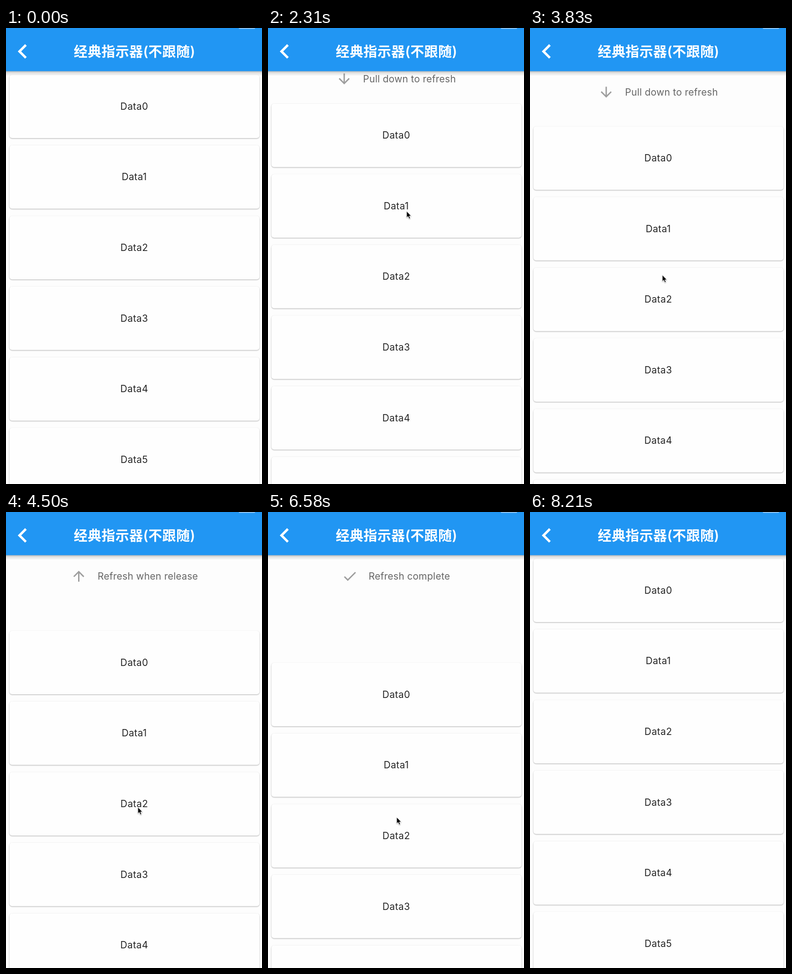
An HTML page that plays this animation: 561 px wide and 998 px high, repeating every 8.5 s.

```html
<!DOCTYPE html>
<html lang="zh">
<head>
<meta charset="utf-8">
<title>Pull to refresh</title>
<style>
  html, body { margin: 0; width: 100%; height: 100%; overflow: hidden; background: #fdfdfd; }
  svg { display: block; width: 561px; height: 998px; }
  text { font-family: Inter, Roboto, "Noto Sans CJK SC", "Noto Sans CJK", sans-serif; font-size: 21px; }
  .card rect { fill: #fefefe; filter: drop-shadow(0 1.6px 1px rgba(0, 0, 0, .32)); }
  .card text { fill: #262626; text-anchor: middle; letter-spacing: .4px; }
  #status { fill: #666; letter-spacing: .25px; }
  .title { font-size: 30px; font-weight: 600; fill: #fff; text-anchor: middle; letter-spacing: .4px; }
</style>
</head>
<body>
<svg viewBox="0 0 561 998">
  <defs>
    <linearGradient id="shade" x2="0" y2="1">
      <stop offset="0" stop-color="#000" stop-opacity=".3"/>
      <stop offset=".4" stop-color="#000" stop-opacity=".11"/>
      <stop offset="1" stop-color="#000" stop-opacity=".02"/>
    </linearGradient>
  </defs>
  <rect width="561" height="998" fill="#fdfdfd"/>
  <g id="header">
    <path id="icon" fill="#9e9e9e"/>
    <path id="spinner" fill="none" stroke="#2196f3" stroke-width="3"/>
    <text id="status" y="148"></text>
  </g>
  <g id="list"></g>
  <rect y="94" width="561" height="10" fill="url(#shade)"/>
  <rect width="561" height="94.5" fill="#2196f3"/>
  <rect x="510" y="-4" width="36" height="6" rx="2" fill="#90c8f8"/>
  <path d="M11.67 3.87L9.9 2.1 0 12l9.9 9.9 1.77-1.77L3.54 12z" transform="translate(26.9 33.2) scale(1.5)"
        fill="#fff" stroke="#fff" stroke-width="1"/>
  <text class="title" x="281.7" y="62">经典指示器(不跟随)</text>
  <path id="cursor" d="M0 0V14L3.2 11.2 5.6 16.5 8 15.4 5.8 10.4H10Z" stroke="#fff"
        style="filter: drop-shadow(0 1px 1px rgba(0,0,0,.35))"/>
</svg>
<script>
const LOOP = 8500, HEADER = 92.5, TRIGGER = 120;
const REFRESH_AT = 5200, DONE_AT = 6110;
const $ = id => document.getElementById(id);

const smooth = u => u * u * (3 - 2 * u);
const accelerate = u => u ** 1.45;
const decay = u => 1 - (1 + 5.7 * u) * Math.exp(-5.7 * u);
const spring = u => decay(u) / decay(1);

// Each gesture leads the pointer and the pull distance to the given values.
const START = { until: 690, x: 548, y: 942, pull: 0 };
const GESTURES = [
  { until: 1300, x: 311, y: 217, pull: 0, ease: smooth },
  { until: 3210, x: 293, y: 680, pull: 159.5, ease: accelerate },
  { until: 3800, x: 290, y: 540, pull: 113, ease: smooth },
  { until: 4500, x: 289, y: 646, pull: 158, ease: smooth },
  { until: 5000, x: 289, y: 650, pull: 159, ease: smooth },
  { until: 6000, x: 288, y: 455, pull: 91, ease: spring },
  { until: 6580, x: 282, y: 668, pull: 228, ease: smooth },
  { until: 8210, x: 556, y: 992, pull: 0, ease: spring }
];

function poseAt(t) {
  let from = START;
  for (const to of GESTURES) {
    if (t < to.until) {
      const u = to.ease(Math.max(0, (t - from.until) / (to.until - from.until)));
      const mix = key => from[key] + (to[key] - from[key]) * u;
      return { x: mix('x'), y: mix('y'), pull: mix('pull'), pointer: t >= START.until };
    }
    from = to;
  }
  return { ...from, pointer: false };
}

// Material standard curve, cubic-bezier(.4, 0, .2, 1)
function standard(x) {
  let lo = 0, hi = 1, s = 0;
  for (let n = 0; n < 20; n++) {
    s = (lo + hi) / 2;
    if (1.2 * s * (1 - s) ** 2 + .6 * s * s * (1 - s) + s ** 3 < x) lo = s; else hi = s;
  }
  return smooth(s);
}

const DOWN = 'M20 12l-1.41-1.41L13 16.17V4h-2v12.17l-5.58-5.59L4 12l8 8 8-8z';
const UP = 'M4 12l1.41 1.41L11 7.83V20h2V7.83l5.58 5.59L20 12l-8-8-8 8z';
const CHECK = 'M9 16.2L4.8 12l-1.4 1.4L9 19 21 7l-1.4-1.4L9 16.2z';
const STATES = {
  pull: { text: 'Pull down to refresh', x: 167, icon: DOWN },
  release: { text: 'Refresh when release', x: 159.5, icon: UP },
  busy: { text: 'Refreshing...', x: 206, icon: '' },
  done: { text: 'Refresh complete', x: 179.3, icon: CHECK }
};

function stateAt(t, pull) {
  if (t >= DONE_AT) return STATES.done;
  if (t >= REFRESH_AT) return STATES.busy;
  return pull < TRIGGER ? STATES.pull : STATES.release;
}

function spinnerPath(t, cx, cy, r) {
  const phase = (t % 1333) / 1333;
  const head = standard(phase * 2), tail = standard(phase * 2 - 1);
  const start = Math.PI * (-.5 + 1.5 * tail + 2 * t / 2222);
  const sweep = Math.max(1.5 * Math.PI * (head - tail), .01);
  const point = a => `${cx + r * Math.cos(a)} ${cy + r * Math.sin(a)}`;
  return `M${point(start)}A${r} ${r} 0 ${+(sweep > Math.PI)} 1 ${point(start + sweep)}`;
}

$('list').innerHTML = Array.from({ length: 6 }, (_, i) => `
  <g class="card" transform="translate(0 ${102 + i * 154.6})">
    <rect x="7.5" width="548" height="139" rx="6"/>
    <text x="281.1" y="76.8">Data${i}</text>
  </g>`).join('');

function render(t) {
  const { x, y, pull, pointer } = poseAt(t);
  const state = stateAt(t, pull);
  $('list').setAttribute('transform', `translate(0 ${pull})`);

  $('header').setAttribute('transform', `translate(0 ${Math.min(0, pull - HEADER)})`);
  $('header').style.display = pull > 1 ? '' : 'none';
  $('status').textContent = state.text;
  $('status').setAttribute('x', state.x + 41.3);
  $('icon').setAttribute('d', state.icon);
  $('icon').setAttribute('transform', `translate(${state.x - 18} 122.5) scale(1.5)`);
  $('spinner').setAttribute('d', state === STATES.busy ? spinnerPath(t - REFRESH_AT, state.x, 141, 18.5) : '');

  $('cursor').style.display = pointer ? '' : 'none';
  $('cursor').setAttribute('transform', `translate(${x} ${y})`);
}

const begin = performance.now();
function tick() {
  render((performance.now() - begin) % LOOP);
  requestAnimationFrame(tick);
}
tick();
</script>
</body>
</html>
```
